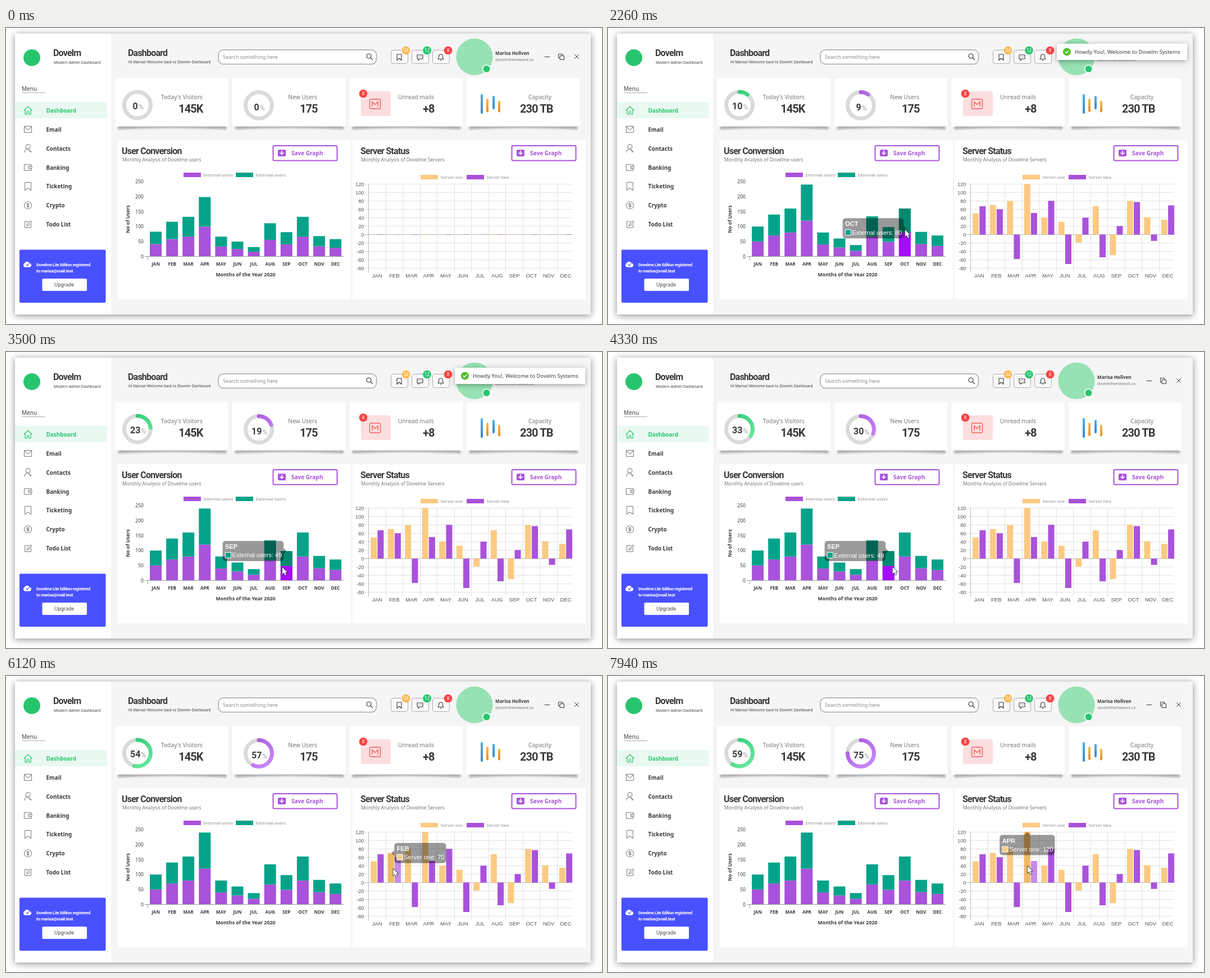
Animation, 1061 px wide and 528 px high, one loop 8000 ms. Source, as an HTML page with a canvas:

```html
<!DOCTYPE html>
<html lang="en">
<head>
<meta charset="utf-8">
<title>Admin dashboard</title>
<style>
html, body { margin: 0; width: 1061px; height: 528px; overflow: hidden; background: #fff; }
canvas { display: block; }
</style>
</head>
<body>
<canvas id="stage" width="1061" height="528"></canvas>
<script>
const g = document.getElementById('stage').getContext('2d');
const LOOP = 8000;
const NOTO = '"Noto Sans", sans-serif', ARIAL = '"Liberation Sans", Arial, sans-serif', ROBOTO = 'Roboto, sans-serif';
const INK = '#3a3a3a', GRAY = '#777', PURPLE = '#a952dc', TEAL = '#04a389', ORANGE = '#fcca82', GREEN = '#28c56f', RED = '#fb4141';
const MONTHS = 'JAN FEB MAR APR MAY JUN JUL AUG SEP OCT NOV DEC'.split(' ');
const USERS = [50, 70, 80, 120, 40, 30, 19, 67, 49, 80, 41, 35];
const SERVER_ONE = USERS.map((v, i) => i === 6 || i === 8 ? -v : v);
const SERVER_TWO = [67, 60, -58, 51, 80, -70, 40, -54, 20, 77, -15, 69];

const clamp = v => Math.max(0, Math.min(1, v));
const mix = (a, b, k) => a + (b - a) * k;
const outQuart = p => 1 - (1 - clamp(p)) ** 4;
function inOutBack(p) {
  const s = 2.595, half = u => .5 * u * u * ((s + 1) * u - s);
  p = clamp(p);
  return p < .5 ? half(2 * p) : 1 - half(2 - 2 * p);
}
// Piecewise interpolation through rows of [time, ...values].
function track(rows, t, ease = k => k) {
  const n = rows.findIndex(r => r[0] > t);
  if (n < 0) return rows.at(-1).slice(1);
  if (n === 0) return rows[0].slice(1);
  const a = rows[n - 1], b = rows[n], k = ease((t - a[0]) / (b[0] - a[0]));
  return a.slice(1).map((v, i) => mix(v, b[i + 1], k));
}

function text(s, x, y, font, color = INK, align = 'left') {
  g.font = font; g.fillStyle = color; g.textAlign = align;
  g.fillText(s, x, y);
}
const noto = (s, x, y, size, color, align, weight = 400) => text(s, x, y, `${weight} ${size}px ${NOTO}`, color, align);
function heading(s, x, y, size, color, align) {
  g.letterSpacing = `${-.05 * size}px`;
  text(s, x, y, `bold ${size}px ${ROBOTO}`, color, align);
  g.letterSpacing = '0px';
}
function rect(x, y, w, h, fill, r = 0, stroke, lw = 1) {
  g.beginPath(); g.roundRect(x, y, w, h, r);
  if (fill) { g.fillStyle = fill; g.fill(); }
  if (stroke) { g.strokeStyle = stroke; g.lineWidth = lw; g.stroke(); }
}
function disc(x, y, r, fill) {
  g.beginPath(); g.arc(x, y, r, 0, 7); g.fillStyle = fill; g.fill();
}
function icon(d, x, y, color, lw = 1.2, fill) {
  const p = new Path2D(d);
  g.save(); g.translate(x, y);
  g.lineWidth = lw; g.lineJoin = g.lineCap = 'round';
  g.strokeStyle = color; g.stroke(p);
  if (fill) { g.fillStyle = fill; g.fill(p); }
  g.restore();
}
function shadowed(color, blur, dy, draw) {
  g.save(); g.shadowColor = color; g.shadowBlur = blur; g.shadowOffsetY = dy;
  draw(); g.restore();
}
function badge(s, x, y, color) {
  disc(x, y, 7.3, color);
  noto(s, x, y + 3, 8, '#fff', 'center');
}

const BOOKMARK = 'M-5.5-7H5.5V7L0 3L-5.5 7Z', ENVELOPE = 'M-6.5-5.5H6.5V5.5H-6.5ZM-6.5-5L0 1L6.5-5';
const MENU = [
  ['Dashboard', 'M-7 0L0-7L7 0M-5-1V7H-1.5V2H1.5V7H5V-1'],
  ['Email', ENVELOPE],
  ['Contacts', 'M4-3A4 4 0 1 1-4-3A4 4 0 1 1 4-3M-6 7Q-5 1 0 1L5 7M1 2L6 6'],
  ['Banking', 'M6-2V-5H-6.5V5.5H6V2M1-2H7V2H1ZM3 0H4'],
  ['Ticketing', BOOKMARK],
  ['Crypto', 'M6.5 0A6.5 6.5 0 1 1-6.5 0A6.5 6.5 0 1 1 6.5 0M2-2Q0-4-2-2Q-2 0 0 0T2 2Q0 4-2 2M0-4V4'],
  ['Todo List', 'M1-5H-5.5V6H5.5V0M-2 3L-1 0L5-6L7-4L1 2Z']
];

function sidebar() {
  rect(16, 10, 171, 501, '#fff');
  disc(46, 53, 15, GREEN);
  heading('Dovelm', 84, 50, 16);
  noto('Modern Admin Dashboard', 85, 64, 6.7);
  noto('Menu', 28, 112, 10, INK, 'left', 500);
  rect(28, 115, 42, 1, '#aaa');
  rect(16, 132, 164, 29, '#e9f9f1');
  MENU.forEach(([label, d], i) => {
    const y = 147 + i * 33.85;
    icon(d, 39, y, i ? '#8e8e8e' : GREEN);
    noto(label, 71.5, y + 4, 9.9, i ? INK : GREEN, 'left', 600);
  });
  rect(24, 395.5, 153.5, 94.5, '#4951ff', 2);
  icon('M-5 4A3.5 3.5 0 0 1-5-2A5 5 0 0 1 4-2A3.2 3.2 0 0 1 5 4Z', 38, 422, '#fff', 1, '#fff');
  icon('M-2 0L0 2L3-2', 38, 422, '#4951ff');
  heading('Dovelme Lite Edition registered', 54, 425, 7.7, '#fff');
  heading('to marisa@mail.test', 54, 436, 8, '#fff');
  rect(64.5, 447, 79.5, 22, '#fff', 2);
  noto('Upgrade', 103.5, 461, 8.6, INK, 'center');
}

function header() {
  heading('Dashboard', 217, 50, 16);
  noto('Hi Marisa! Welcome back to Dovelm Dashboard', 218, 63, 6.6);
  rect(378, 39, 281.5, 25.5, '#fff', 9, '#b9b9b9', 2);
  noto('Search something here', 386, 54.5, 9, '#8a8a8a');
  icon('M3-1A4 4 0 1 1-5-1A4 4 0 1 1 3-1M2 2L5.5 5.5', 647, 51, INK);
  const buttons = [
    ['M-4-5H4V5.5L0 2L-4 5.5Z', '34', '#fdb94f'],
    ['M-5-4H5V3H0L-3 5.5V3H-5ZM-2.5-.5H-2.4M0-.5H.1M2.5-.5H2.6', '12', GREEN],
    ['M-5 3.5L-3.5 1V-1.5A3.5 3.5 0 0 1 3.5-1.5V1L5 3.5ZM-1 5.5H1', '8', RED]
  ];
  buttons.forEach(([d, count, color], i) => {
    const x = 685.5 + i * 37;
    rect(x, 39.5, 30, 24, '#f9f9f9', 4, '#aaa');
    icon(d, x + 14.5, 52, INK, 1.1);
    badge(count, x + 26.5 + i * .5, 40, color);
  });
  disc(834, 51.5, 32.7, '#97e2b5');
  disc(855.5, 73, 7.6, '#fff');
  disc(855.5, 73, 6, GREEN);
  noto('Marisa Hollven', 871, 48, 8.1, INK, 'left', 600);
  noto('dovelmframework.co', 871, 59, 6.9, GRAY);
  icon('M-4.5 0H4.5', 963.5, 51.5, INK, 1);
  icon('M-2-2H5V5H-2ZM-5 2V-5H2V-3M-5 2H-3', 988.5, 51.5, INK, 1);
  icon('M-3.5-3.5L3.5 3.5M3.5-3.5L-3.5 3.5', 1016, 51, INK, 1);
}

function ring(x, y, value, from, to, labelX, labelY) {
  g.lineWidth = 7; g.lineCap = 'round';
  g.beginPath(); g.arc(x, y, 23.5, 0, 7);
  g.strokeStyle = '#dadada'; g.stroke();
  if (value > .3) {
    const fade = g.createLinearGradient(x - 15, y - 25, x + 22, y + 22);
    fade.addColorStop(0, from); fade.addColorStop(1, to);
    g.beginPath(); g.arc(x, y, 23.5, -Math.PI / 2, (value / 50 - .5) * Math.PI);
    g.strokeStyle = fade; g.stroke();
  }
  const s = String(Math.floor(value)), left = labelX - (s.length * 9 + 11) / 2;
  text(s, left, labelY, `bold 16px ${ROBOTO}`);
  text('%', left + s.length * 9 + 1, labelY, `13px ${ROBOTO}`, '#a3a3a3');
}

const VISITORS = [[0, 0], [1090, 4.3], [2260, 10.4], [3500, 23.4], [5240, 45.4], [6630, 59]];
const NEW_USERS = [[0, 0], [1090, 5.2], [2260, 9.5], [3500, 19.4], [5240, 42.4], [6800, 68.4], [7500, 75]];

function cards(t) {
  const info = [["Today's Visitors", '145K', 350], ['New Users', '175', 554], ['Unread mails', '+8', 762], ['Capacity', '230 TB', 973]];
  info.forEach(([label, value, right], i) => {
    const x = 194.5 + i * 208.4;
    g.save(); g.filter = 'blur(1.5px)';
    g.beginPath(); g.moveTo(x + 5, 170); g.lineTo(x + 5, 181);
    g.quadraticCurveTo(x + 101, 176, x + 198, 181); g.lineTo(x + 198, 170);
    g.fillStyle = '#b4b4b4'; g.fill(); g.restore();
    rect(x, 89.5, 201.5, 86, '#fff');
    noto(label, right - (i === 3 ? 2 : 0), 127, 10.3, GRAY, 'right');
    heading(value, right + .5, 151, 20, INK, 'right');
  });
  ring(234, 137.5, track(VISITORS, t)[0], '#31c974', '#68eba0', 235.5, 145);
  ring(450, 138, track(NEW_USERS, t)[0], '#a85bdd', '#cb8aff', 451.5, 146.5);
  rect(632, 113, 53, 44, '#fcdede', 3);
  icon('M-8-8.5H8Q9.5-8.5 9.5-7V7Q9.5 8.5 8 8.5H-8Q-9.5 8.5-9.5 7V-7Q-9.5-8.5-8-8.5ZM-5 4V-4L0 1L5-4V4', 657, 135.5, '#f0615f', 1.4);
  badge('8', 636, 117, RED);
  [[847, 118, 35], [857, 126, 24], [868, 121, 24], [878, 129.5, 21]].forEach(([x, y, h], i) => {
    const fade = g.createLinearGradient(0, y, 0, y + h);
    fade.addColorStop(0, i % 2 ? '#f5bb4c' : '#4bb2e8');
    fade.addColorStop(1, i % 2 ? '#e48c25' : '#3988c8');
    rect(x - 2, y, 4, h, fade, 2);
  });
}

function panel(x, inset, title, sub) {
  rect(x, 200, 415, 284, '#fff');
  const left = x + inset;
  heading(title, left, 225, 16);
  noto(sub, left + 1, 237.5, 8.6, GRAY);
  rect(left + 269.5, 210, 114, 26.5, '#fff', 2, PURPLE, 2);
  rect(left + 278, 217, 14, 12, PURPLE, 2);
  icon('M0-4V2M-3-.5L0 2.5L3-.5', left + 285, 223, '#fff', 1.6);
  noto('Save Graph', left + 302, 227, 10, PURPLE, 'left', 600);
}
function legend(x, y, color, label) {
  rect(x, y, 31, 8, color);
  noto(label, x + 35.5, y + 7, 7.5, '#b0b0b0', 'left', 600);
}

// Hovered bars: time on, time the tip fades, time the bar is released.
const HOVERS = {
  users: [
    { i: 9, on: 1850, tipOff: 2242, off: 2242, label: 'Internal users', color: PURPLE, y: 364.8 },
    { i: 9, on: 2242, tipOff: 3150, off: 3150, label: 'External users', color: TEAL, y: 322 },
    { i: 8, on: 3150, tipOff: 4330, off: 4330, label: 'External users', color: TEAL, y: 355 }
  ],
  servers: [
    { i: 0, on: 4700, tipOff: 4960, off: 5185, label: 'Server two', color: PURPLE, y: 318, series: 1 },
    { i: 1, on: 5185, tipOff: 6640, off: 6640, label: 'Server one', color: ORANGE, y: 315.7 },
    { i: 2, on: 6640, tipOff: 7280, off: 7610, label: 'Server one', color: ORANGE, y: 308.2 },
    { i: 3, on: 7610, tipOff: 9000, off: 9000, label: 'Server one', color: ORANGE, y: 278, below: true }
  ]
};
function glow(list, i, t) {
  return Math.max(0, ...list.filter(h => h.i === i && t >= h.on).map(h => {
    if (t >= h.off) return 1 - outQuart((t - h.off) / 300);
    return list.some(o => o.i === i && o.off === h.on) ? 1 : outQuart((t - h.on) / 300);
  }));
}
function bar(x, y, w, h, color, hot, amount) {
  rect(x, y, w, h, color);
  if (amount > 0) { g.globalAlpha = amount; rect(x, y, w, h, hot); g.globalAlpha = 1; }
}

const userX = i => 252 + (i + .5) * 29.09;
const serverX = i => 645.5 + (i + .5) * 30.52;
const serverY = v => 368.4 - v * .7525;

function usersPanel(t) {
  panel(199, 7, 'User Conversion', 'Monthly Analysis of Dovelme users');
  legend(316, 258, PURPLE, 'Internal users');
  legend(409, 258, TEAL, 'External users');
  for (let v = 0; v <= 250; v += 50) noto(v, 245, 410.8 - v * .534, 8.6, INK, 'right', 500);
  const grow = outQuart((t + 710) / 2000);
  MONTHS.forEach((m, i) => {
    const x = userX(i), h = USERS[i] * .534 * grow, hot = glow(HOVERS.users, i, t);
    bar(x - 10.5, 407.5 - h, 21, h, PURPLE, '#a60cff', hot);
    bar(x - 10.5, 407.5 - 2 * h, 21, h, TEAL, '#008a72', hot);
    noto(m, x, 424, 8, INK, 'center', 600);
  });
  rect(247, 407, 354, 1, '#999');
  rect(252, 407, 1, 7, '#999');
  noto('Months of the Year 2020', 426.5, 443, 8.8, INK, 'center', 600);
  g.save(); g.translate(220, 341); g.rotate(-Math.PI / 2);
  noto('No of Users', 0, 0, 8.6, INK, 'center', 600);
  g.restore();
}

function serversPanel(t) {
  panel(617, 14, 'Server Status', 'Monthly Analysis of Dovelme Servers');
  legend(738, 262, ORANGE, 'Server one');
  legend(820, 262, PURPLE, 'Server two');
  for (let v = -80; v <= 120; v += 20) {
    const y = Math.round(serverY(v) - .5);
    rect(638, y, 370, 1, v ? '#e2e2e2' : '#b5b5b5');
    text(v, 637.5, y + 3.5, `9.3px ${ARIAL}`, '#555', 'right');
  }
  MONTHS.forEach((m, i) => {
    rect(Math.round(serverX(i - .5) - .5), 278, 1, 158, i ? '#e2e2e2' : '#bbb');
    text(m, serverX(i), 445, `9.5px ${ARIAL}`, '#555', 'center');
  });
  const grow = inOutBack((t + 710) / 2000), zero = serverY(0);
  g.save(); g.beginPath(); g.rect(645, 278, 363.5, 151); g.clip();
  MONTHS.forEach((m, i) => {
    const x = serverX(i), hot = glow(HOVERS.servers, i, t);
    bar(x - 11.6, zero, 11, serverY(SERVER_ONE[i] * grow) - zero, ORANGE, '#efb967', hot);
    bar(x + .6, zero, 11, serverY(SERVER_TWO[i] * grow) - zero, PURPLE, '#c68cea', hot);
  });
  g.restore();
}

function tipBox(kind, h) {
  const value = kind === 'users' ? USERS[h.i] : (h.series ? SERVER_TWO : SERVER_ONE)[h.i];
  const body = `${h.label}: ${value}`;
  g.font = `11px ${ARIAL}`;
  const w = g.measureText(body).width + 20;
  const barX = kind === 'users' ? userX(h.i) : serverX(h.i) + (h.series ? 6 : -6);
  const x = h.below ? barX - w / 2 : kind === 'users' ? barX - 5 - w : barX + 6;
  return { body, w, x, y: h.below ? 283.5 : h.y - 18 };
}
function tip(kind, t) {
  const list = HOVERS[kind], n = list.findLastIndex(h => t >= h.on);
  if (n < 0) return;
  const h = list[n], prev = list[n - 1], k = outQuart((t - h.on) / 400);
  const shown = prev && prev.tipOff >= h.on ? 1 : k;
  const alpha = t < h.tipOff ? shown : 1 - outQuart((t - h.tipOff) / 400);
  if (alpha <= 0) return;
  const box = tipBox(kind, h), from = prev ? tipBox(kind, prev) : box;
  const x = mix(from.x, box.x, k), y = mix(from.y, box.y, k);
  g.globalAlpha = alpha;
  rect(x, y, box.w, 36, 'rgba(0,0,0,.4)', 5);
  const [cx, cy, dx, dy] = h.below ? [x + box.w / 2, y, 0, -5]
    : kind === 'users' ? [x + box.w, y + 18, 5, 0] : [x, y + 18, -5, 0];
  g.beginPath(); g.moveTo(cx + dy, cy + dx); g.lineTo(cx + dx, cy + dy); g.lineTo(cx - dy, cy - dx);
  g.fillStyle = 'rgba(0,0,0,.4)'; g.fill();
  text(MONTHS[h.i], x + 4.5, y + 14, `bold 11px ${ARIAL}`, '#fff');
  rect(x + 5, y + 20.5, 10, 10, h.color, 0, '#fff');
  text(box.body, x + 17, y + 29.5, `11px ${ARIAL}`, '#fff');
  g.globalAlpha = 1;
}

function toast(t) {
  const shown = clamp((t - 1820) / 450), leave = clamp((t - 3720) / 320);
  if (!shown || leave === 1) return;
  g.save(); g.globalAlpha = shown * (1 - leave); g.translate(leave * leave * 40, 0);
  shadowed('rgba(0,0,0,.35)', 10, 2, () => rect(799, 28, 232, 29, '#fff', 1));
  disc(817, 42.5, 7, '#52bd2c');
  icon('M-3 0L-1 2.3L3-2', 817, 42.5, '#fff', 1.4);
  noto('Howdy You!, Welcome to Dovelm Systems', 831, 46, 9.6);
  g.restore();
}

const POINTER = [[880, 648, 503], [1090, 640, 471], [1500, 562, 405], [1850, 535, 384], [2260, 529, 360], [3000, 527, 366],
  [3160, 508, 380], [3500, 492, 384], [4260, 495, 386], [4700, 662, 347], [5050, 669, 346], [5240, 686, 342],
  [6450, 690, 344], [6640, 710, 345], [6800, 720, 344], [7480, 722, 344], [7610, 736, 341], [7800, 747, 339]];
function pointer(t) {
  if (t < 890) return;
  const [x, y] = track(POINTER, t, k => k * k * (3 - 2 * k));
  icon('M0 0V12.5L2.8 9.8L5 14.5L7 13.6L4.9 9H8.8Z', x, y, '#222', 1.4, '#fff');
}

function draw(now) {
  const t = now % LOOP;
  g.fillStyle = '#fff'; g.fillRect(0, 0, 1061, 528);
  shadowed('rgba(0,0,0,.45)', 12, 2, () => rect(16, 10, 1025, 501, '#f5f5f5'));
  sidebar();
  header();
  cards(t);
  usersPanel(t);
  serversPanel(t);
  tip('users', t);
  tip('servers', t);
  toast(t);
  pointer(t);
  requestAnimationFrame(draw);
}
requestAnimationFrame(draw);
</script>
</body>
</html>
```
